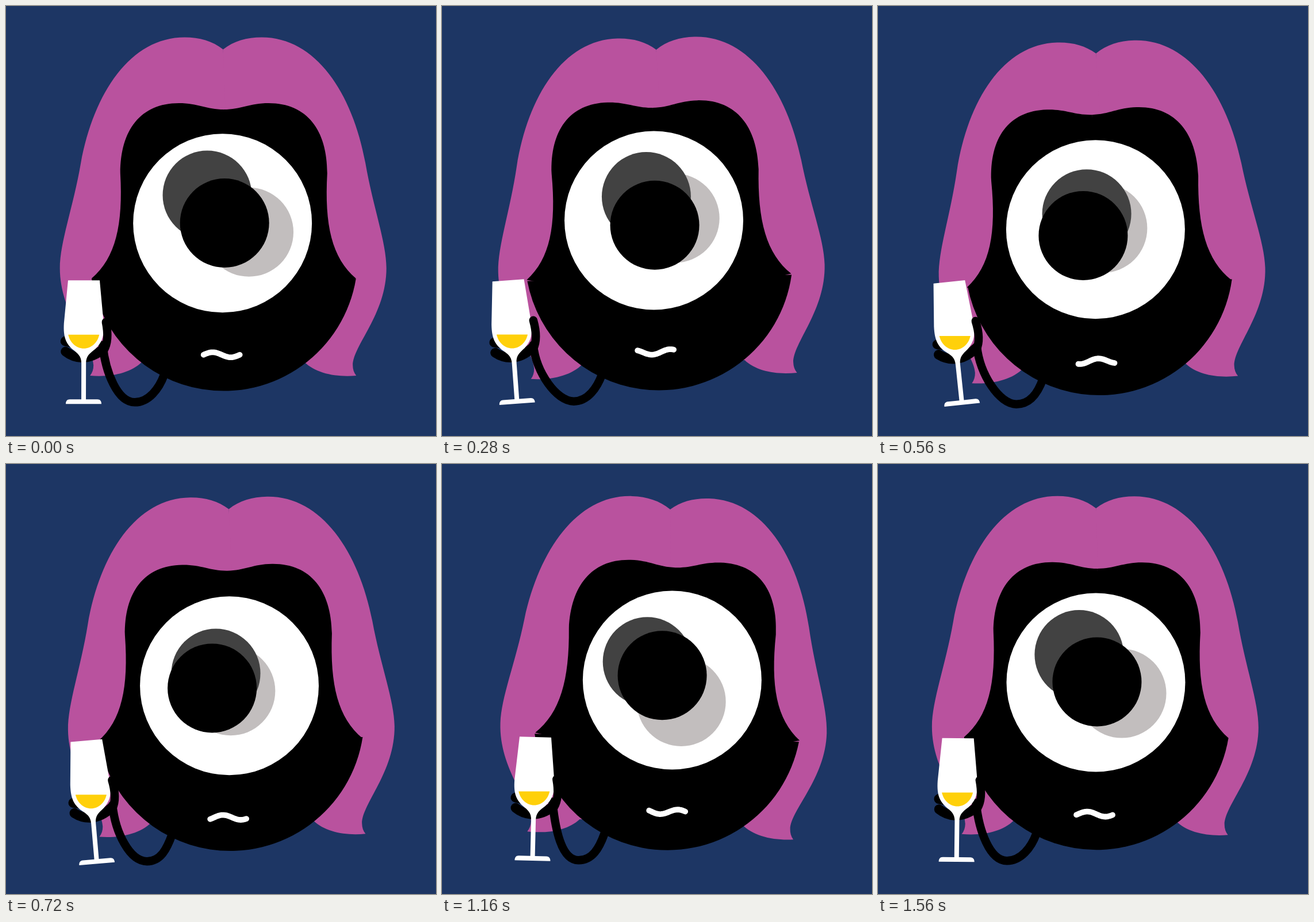
These frames come from a looping animation (748 by 748 pixels, 1.6 s). An HTML page with a canvas:

```html
<!DOCTYPE html>
<html lang="en">
<head>
<meta charset="utf-8">
<title>Cheers</title>
<style>
  html, body { margin: 0; height: 100%; overflow: hidden; background: #1d3664; }
  canvas { display: block; width: 100vw; height: 100vh; }
</style>
</head>
<body>
<canvas id="stage" width="748" height="748"></canvas>
<script>
const ctx = document.getElementById('stage').getContext('2d');
const LOOP = 1600, STEP = 40, MID = 378.5;
const PINK = '#b9529e', WHITE = '#fff', BLACK = '#000';

// Right halves, x measured from the middle of the face
const hairHalf = new Path2D('M0 74.5C18.5 60 41 53.5 67 53.5C161 53.5 225 150 247.5 272' +
  'C261 350 284 410 284 455C284 535 225.5 590 225.5 624C225.5 631 227.5 637 231.5 642' +
  'C196 645 161 638 141 618H-20Z');
const faceHalf = new Path2D('M0 179C30 179 45 168 78 168C145 168 180 215 180 290' +
  'C175 380 188 437 230 473L0 520L-20 510Z');

// Hand and glass, measured from the middle of the liquid surface
const glass = new Path2D('M-27.5-94.5H27.5L34.5-20C36 6 30 15 20 25C10 33 4 37 4 50V112.5H24' +
  'C29 112.5 31 116 31 120.5H-31C-31 116-29 112.5-24 112.5H-4V50C-4 37-10 33-20 25' +
  'C-30 15-36 6-34.5-20Z');
const liquid = new Path2D('M-27 0H27C24 14 13 24 0 24C-13 24-24 14-27 0Z');
const fingers = new Path2D('M-32 11.5L0 18M-31.5 29.5C-18 40 6 48 34 25');
const thumb = new Path2D('M38.5-22C43 0 42 15 35 27');

// The head sways once per loop and bobs twice; every part follows with its own lag
function poseAt(t) {
  const wave = (size, peak, period) => size * Math.cos(2 * Math.PI * (t - peak) / period);
  const sway = (size, peak) => wave(size, peak, LOOP);
  const bob = (size, peak) => wave(size, peak, LOOP / 2);

  const bodyY = 3 + bob(5.6, 555);
  const eyeY = 379.3 + bob(8, 600) + sway(1.9, 650);
  return {
    tilt: sway(.0297, 1200) + bob(.0035, 200),
    hair: { x: 6.3 + sway(7.5, 885), y: 3.4 + bob(4.7, 535) },
    body: { x: 7 + sway(8.8, 980), y: bodyY },
    faceY: (eyeY - 377 + bodyY) / 2,
    eye: { x: 385 + sway(16.5, 1065), y: eyeY },
    pupil: {
      x: 372.5 + sway(13.5, 1380) + bob(2.8, 250),
      y: eyeY + .8 + sway(9.5, 400) + bob(2.3, 540)
    },
    dark: { x: 357.5 + sway(7.6, 750), y: 344.5 + sway(15.5, 790) + bob(8, 600) },
    light: { x: 408 + sway(18, 1440), y: 395 + sway(21, 1180) + bob(8, 600) },
    glass: {
      x: 143 + sway(20, 1075) + bob(1.7, 0),
      y: 572 + sway(2.2, 620) + bob(1.4, 780),
      tilt: -.033 + sway(.072, 1330)
    },
    arm: { x: 235 + sway(11, 820), y: 689.8 + bob(3, 580) }
  };
}

function at(x, y, angle, paint) {
  ctx.save();
  ctx.translate(x, y);
  ctx.rotate(angle);
  paint();
  ctx.restore();
}

function fill(path, color) {
  ctx.fillStyle = color;
  ctx.fill(path);
}

function stroke(path, width, color = BLACK) {
  ctx.lineWidth = width;
  ctx.strokeStyle = color;
  ctx.stroke(path);
}

function disc({ x, y }, r, color) {
  const path = new Path2D();
  path.arc(x, y, r, 0, 2 * Math.PI);
  fill(path, color);
}

function mirrored(half, color) {
  fill(half, color);
  ctx.scale(-1, 1);
  fill(half, color);
}

function drawHead({ tilt, hair, body, faceY }) {
  at(MID + hair.x, 358 + hair.y, tilt, () => {
    ctx.translate(0, -358);
    mirrored(hairHalf, PINK);
  });
  at(MID + body.x, 435.5 + body.y, tilt, () => {
    const chin = new Path2D();
    chin.arc(0, 0, 233, .162, Math.PI - .162);
    fill(chin, BLACK);
  });
  at(MID + body.x, 472 + faceY, 0, () => {
    ctx.transform(1, tilt, -1.55 * tilt, 1, 0, 0);
    ctx.translate(0, -472);
    mirrored(faceHalf, BLACK);
  });
}

function drawEye({ eye, light, dark, pupil }) {
  disc(eye, 155.5, WHITE);
  disc(light, 77.5, '#c2bebe');
  disc(dark, 77.5, '#424242');
  disc(pupil, 77.5, BLACK);
}

function drawMouth({ body, eye, tilt }, t) {
  const x = 375.5 + .7 * body.x + .3 * (eye.x - MID);
  const lips = new Path2D();
  for (let u = 0; u <= 1; u += 1 / 32)
    lips.lineTo(63 * (u - .5), -4.4 * Math.sin(2 * Math.PI * (u + 2 * t / LOOP)));
  at(x, eye.y + 229, tilt, () => stroke(lips, 9.8, WHITE));
}

function drawArm({ arm: { x, y }, glass, body, tilt }) {
  const handX = glass.x + 33 - 50 * glass.tilt, handY = glass.y + 18;
  const endX = 275 + body.x - 205 * tilt, endY = 640 + body.y;
  const path = new Path2D();
  path.moveTo(handX, handY);
  path.bezierCurveTo(handX + 5, handY + 48, x - 30, y, x, y);
  path.bezierCurveTo(x + 24, y, endX - 9, endY + 25, endX, endY);
  path.lineTo(endX + 9, endY - 25);
  stroke(path, 14.5);
}

function drawGlass({ glass: { x, y, tilt } }) {
  at(x, y, tilt, () => {
    stroke(fingers, 17);
    fill(glass, WHITE);
  });
  at(x, y, 0, () => fill(liquid, '#ffd00a'));
  at(x, y, tilt, () => stroke(thumb, 14.5));
}

function draw(now) {
  const t = Math.floor(now / STEP) * STEP % LOOP;
  const pose = poseAt(t);
  ctx.fillStyle = '#1d3664';
  ctx.fillRect(0, 0, 748, 748);
  ctx.lineCap = ctx.lineJoin = 'round';
  drawHead(pose);
  drawEye(pose);
  drawMouth(pose, t);
  drawArm(pose);
  drawGlass(pose);
}

const start = performance.now();
function tick() {
  draw(performance.now() - start);
  requestAnimationFrame(tick);
}
tick();
</script>
</body>
</html>
```
